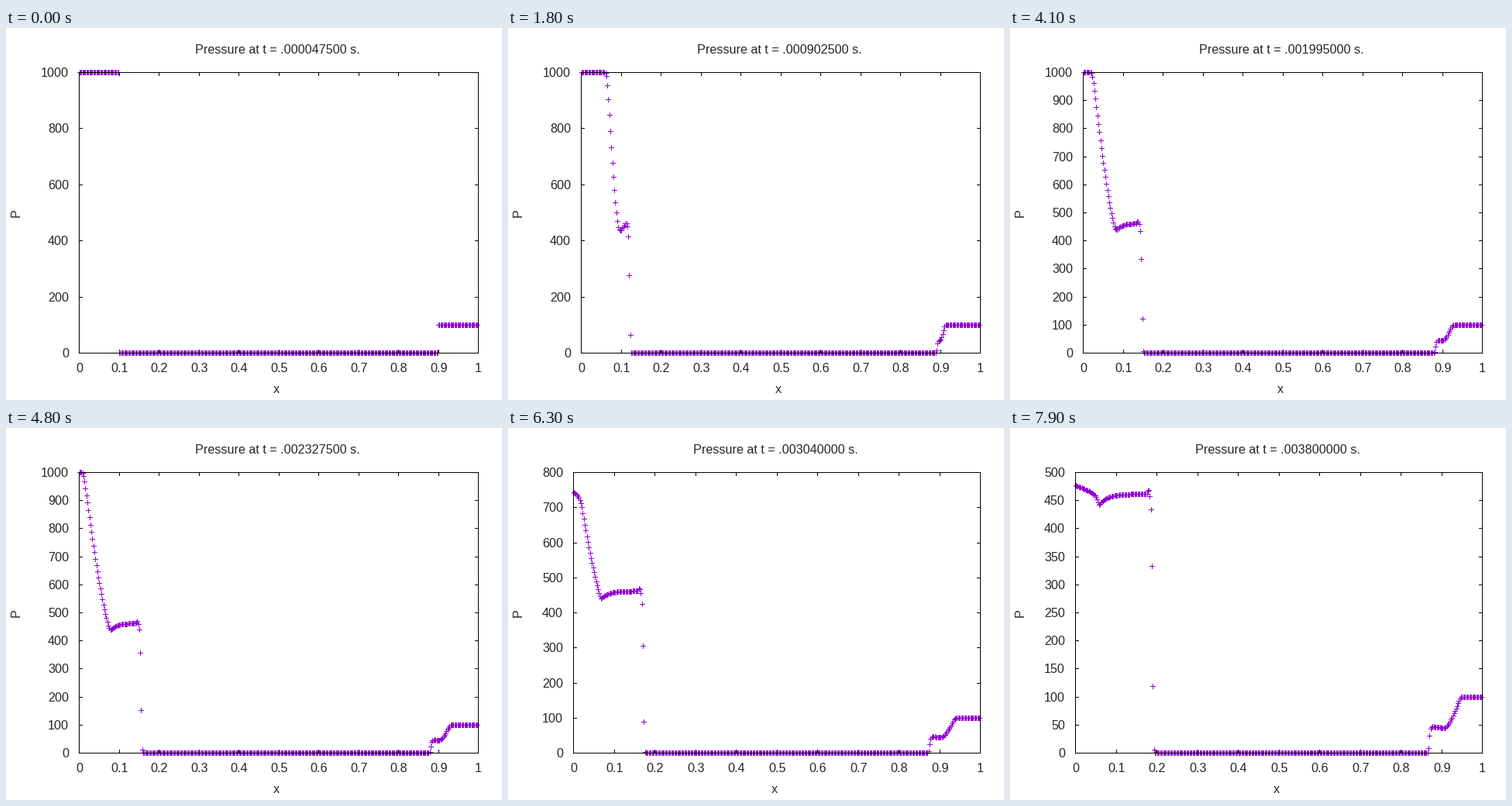
These frames come from a looping animation (640 by 480 pixels, 8 s). A matplotlib script:

```python
import numpy as np
import matplotlib.pyplot as plt
from matplotlib.animation import FuncAnimation
from matplotlib.collections import LineCollection

W, H, DPI = 640, 480, 100
FRAMES, INTERVAL = 80, 100
PX = 72 / DPI
TOP, BOTTOM, RIGHT = 57, 419, 609
PURPLE, INK = "#9400d3", "#262626"

CELLS = 400
GAP = 39.5            # cells between a wall and its pressure jump
SOUND = .711          # cells per step
SHOCK = .4469
FLOOR, PLATEAU, PEAK = 437, 461, 1000
FINE_TICKS_FROM = 31

plt.rcParams["font.family"] = "Liberation Sans"
plt.rcParams["font.size"] = 16.1 * PX


def fan(j, n):
    """Rarefaction: each pressure level drifts at its own speed u - c."""
    logit = np.linspace(9, -9, 200)
    p = FLOOR + (PEAK - FLOOR) / (1 + np.exp(-logit))
    c = (p / PEAK) ** (1 / 7)
    smear = .5 * min(1, n / 8)
    return np.interp(j, GAP - smear * logit + SOUND * n * (5 - 6 * c), p)


def plateau(j, n):
    """Level behind the shock, recovering from a dip at the fan's tail."""
    dip = 44.5 - .25 * n
    return PLATEAU - (26 - .13 * n) * np.exp((dip - j) / (2 + .075 * n))


def front(j, n):
    """Smeared shock with a small overshoot behind it."""
    middle = GAP + SHOCK * n + .7 * (1 - np.exp(-n / 6))
    width = 1 - np.exp(-n / 4) + 1e-9
    d = np.clip((j - middle) / width, -6, 5)
    drop = np.exp(-np.exp(-.37 + 1.42 * d - .12 * d ** 2))
    return drop + .02 * np.exp(-(d + 3.9) ** 2 / .8)


def blast(j, n):
    """Pressure after n steps, j cells from the wall."""
    # sound speeds of the fan and its wall reflection add up
    direct = (fan(j, n) / PEAK) ** (1 / 7)
    echo = (fan(-1 - j / 1.18, n) / PEAK) ** (1 / 7)
    p = PEAK * (direct + (1 + .0013 * n) * (echo - 1)) ** 7
    return np.minimum(PEAK, np.maximum(p, plateau(j, n)) * front(j, n))


def pressure(n):
    j = np.arange(CELLS)
    # a tenth of the pressure moves sqrt(10) times slower
    return blast(j, n) + .1 * blast(CELLS - 1 - j, n / np.sqrt(10))


def y_scale(n, peak):
    step = 100 if peak >= 500 else 50
    top = int(np.ceil(round(peak) / step)) * step
    return top, step if n >= FINE_TICKS_FROM else 200


def snap(v):
    return np.floor(v + .5) + .5


fig = plt.figure(figsize=(W / DPI, H / DPI), dpi=DPI, facecolor="white")
ax = fig.add_axes([0, 0, 1, 1])
ax.set_xlim(0, W)
ax.set_ylim(H, 0)
ax.axis("off")


def strokes(color, z):
    lines = LineCollection([], colors=color, linewidths=PX, zorder=z,
                           capstyle="butt", snap=False)
    ax.add_collection(lines, autolim=False)
    return lines


def label(x, y, text="", **kw):
    kw = {"ha": "center", "va": "baseline", **kw}
    return ax.text(x, y, text, color=INK, zorder=4, **kw)


ticks = strokes("black", 1)
marks = strokes(PURPLE, 2)
border = strokes("black", 3)
title = label(0, 33)
x_name = label(0, 471, "x")
label(13, 238.5, "P", rotation=90, va="center")
x_labels = [label(0, 443.5, f"{k / 10:g}") for k in range(11)]
y_labels = [label(0, 0, ha="right") for _ in range(11)]


def draw_axes(left, top, step):
    l, r, t, b = left + .5, RIGHT + .5, TOP + .5, BOTTOM + .5
    border.set_segments([[(left, t), (RIGHT + 1, t)], [(left, b), (RIGHT + 1, b)],
                         [(l, TOP), (l, BOTTOM + 1)], [(r, TOP), (r, BOTTOM + 1)]])
    segs = []
    for k, text in enumerate(x_labels):
        x = snap(left + (RIGHT - left) * k / 10)
        segs += [[(x, t), (x, t + 4.5)], [(x, b), (x, b - 4.5)]]
        text.set_x(x)
    values = range(0, top + 1, step)
    for k, text in enumerate(y_labels):
        if k >= len(values):
            text.set_text("")
            continue
        y = snap(BOTTOM - (BOTTOM - TOP) * values[k] / top)
        segs += [[(l, y), (l + 4.5, y)], [(r, y), (r - 4.5, y)]]
        text.set_text(str(values[k]))
        text.set_position((left - 13, y + 5.5))
    ticks.set_segments(segs)


def draw_marks(left, top, p):
    x = snap(left + (RIGHT - left) * (np.arange(CELLS) + .5) / CELLS)
    y = snap(BOTTOM - (BOTTOM - TOP) * p / top)
    center = np.stack([x, y], 1)
    arms = np.array([(3.5, 0), (0, 3.5)])
    marks.set_segments(np.concatenate(
        [np.stack([center - a, center + a], 1) for a in arms]))


def draw(n):
    p = pressure(n)
    top, step = y_scale(n, p.max())
    left = 94 if top >= 1000 else 84
    draw_axes(left, top, step)
    draw_marks(left, top, p)
    title.set_text(f"Pressure at t = .{(n + 1) * 47500:09d} s.")
    title.set_x((left + RIGHT) / 2 - 1.4)
    x_name.set_x((left + RIGHT) / 2 - 3)
    return []


anim = FuncAnimation(fig, draw, frames=FRAMES, init_func=lambda: draw(0),
                     interval=INTERVAL, repeat=True, repeat_delay=0)
plt.show()
```
